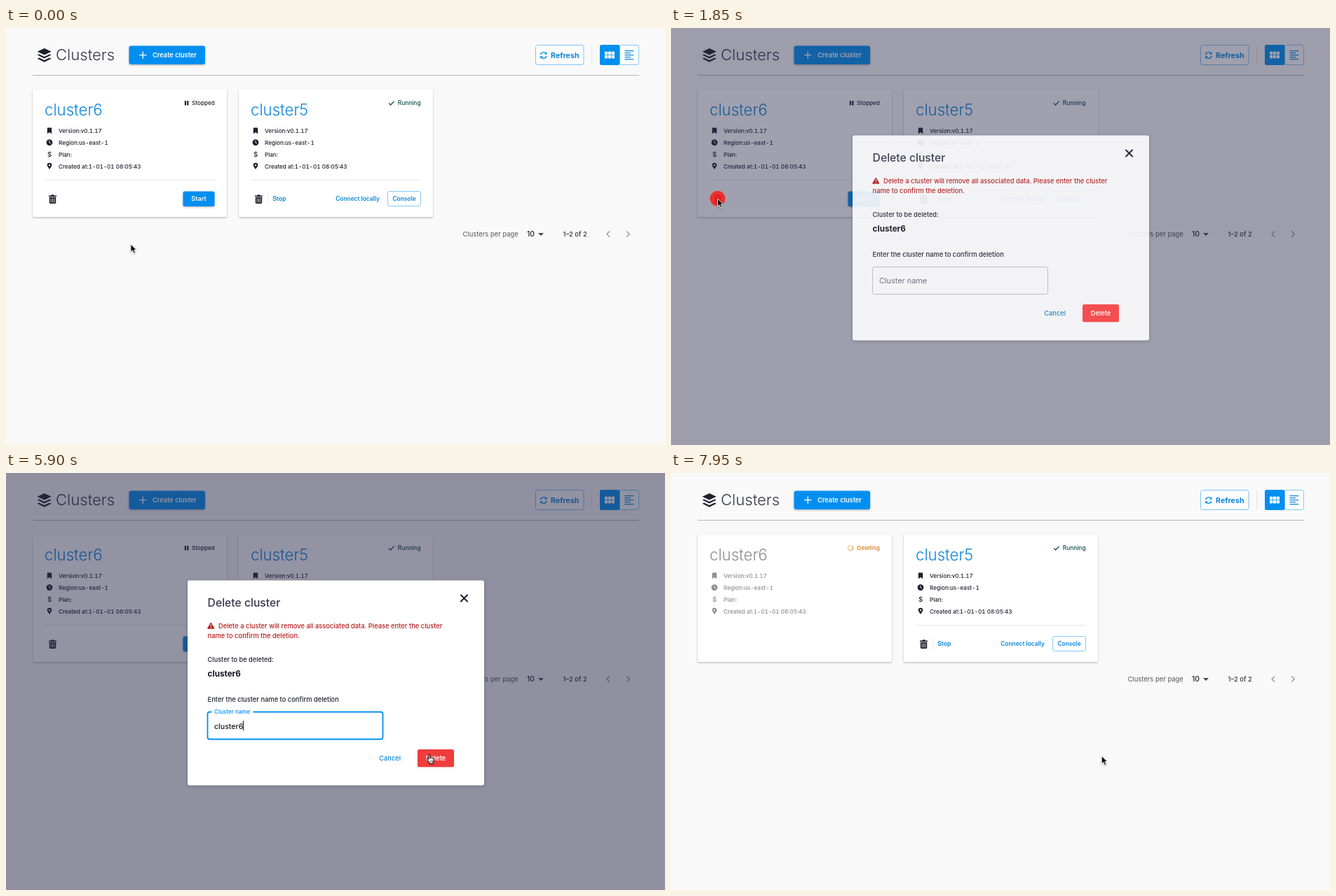
These frames come from a looping animation (940x596 px, 8000 ms). An HTML page:

```html
<!DOCTYPE html>
<html lang="en">
<head>
<meta charset="utf-8">
<title>Clusters</title>
<style>
  html, body { margin: 0; width: 100%; height: 100%; overflow: hidden; background: #f9f9f9; }
  svg { display: block; width: 940px; height: 596px; font-family: Inter, "Open Sans", sans-serif; font-optical-sizing: none; }
  text { white-space: pre; }
  .raised { filter: drop-shadow(0 1px 1.5px rgba(0, 0, 0, .3)); }
  .facts { font-variant-numeric: tabular-nums; }
</style>
</head>
<body>
<svg id="stage" viewBox="0 0 940 596" xmlns="http://www.w3.org/2000/svg"></svg>
<script>
const LOOP = 8000, STEP = 50;
const BLUE = '#008ff0', LINK = '#0c86d8', DARK = '#20202f', RED = '#b71c1c';

const stage = document.getElementById('stage');
const $ = id => document.getElementById(id);

const text = (x, y, size, weight, fill, str, anchor = 'start', id = '') =>
  `<text ${id && `id="${id}"`} x="${x}" y="${y}" font-size="${size}" font-weight="${weight}" fill="${fill}" text-anchor="${anchor}">${str}</text>`;
const box = (x, y, w, h, r, fill, extra = '') =>
  `<rect x="${x}" y="${y}" width="${w}" height="${h}" rx="${r}" fill="${fill}" ${extra}/>`;
const line = (d, stroke, width = 1, extra = '') =>
  `<path d="${d}" fill="none" stroke="${stroke}" stroke-width="${width}" ${extra}/>`;
const shape = (d, fill, extra = '') => `<path d="${d}" fill="${fill}" ${extra}/>`;
const at = (x, y, body, extra = '') => `<g transform="translate(${x} ${y})" ${extra}>${body}</g>`;

// Page parts
function header() {
  const layers = shape('M0-10 10-5.2 0-.6-10-5.2z', DARK) +
    shape('M-7.6-1.6 0 1.9 7.6-1.6 10-.4 0 4.4-10-.4z', DARK) +
    shape('M-7.6 3.6 0 7 7.6 3.6 10 4.8 0 9.7-10 4.8z', DARK);
  const half = line('M-4.2-.8A4.2 4.2 0 0 1 3.2-2.8', BLUE, 1.4) + shape('M4.7-4.9V-1.2H1z', BLUE);
  let grid = '', rows = '';
  for (let i = 0; i < 6; i++) grid += box(854 + i % 3 * 4.9, 33.7 + (i > 2 ? 5.2 : 0), 4.2, 4.5, 0, '#fff');
  for (let i = 0; i < 5; i++) rows += `M882.5 ${32.6 + i * 3}h${i % 2 ? 8.5 : 12.8}`;
  return at(54.7, 39, layers) +
    text(71, 46, 22.1, 350, '#36364d', 'Clusters') +
    box(175.5, 25.5, 108.5, 26.5, 3, BLUE, 'class="raised"') +
    line('M190 38.7h10.5M195.2 33.5v10.5', '#fff', 1.3) +
    text(209, 42, 9.25, 600, '#fff', 'Create cluster') +
    box(755.5, 24.5, 68.5, 28, 3, '#fdfdfd', 'stroke="#80c2f1"') +
    at(766.8, 39, half + `<g transform="rotate(180)">${half}</g>`) +
    text(777, 43, 10.7, 700, LINK, 'Refresh') +
    line('M835.5 25v28', '#e4e4e4') +
    box(875, 24.5, 27.5, 28, 2.5, '#fdfdfd', 'stroke="#86c8f4"') +
    box(847, 24, 28.5, 29, 2.5, BLUE) + grid + line(rows, LINK, 1.2) +
    line('M38 67.5h865', '#b5b5b9');
}

function trash(x) {
  return shape(`M${x} 239.6h3.2l.8-1.4h3l.8 1.4h3.2v1.6h-11z`, DARK) +
    shape(`M${x + .8} 242h9.4v7.6q0 1.4-1.4 1.4h-6.6q-1.4 0-1.4-1.4z`, DARK) +
    line(`M${x + 3.1} 243.5v6M${x + 5.5} 243.5v6M${x + 7.9} 243.5v6`, '#fff', .8);
}

function details(x, name, id) {
  const ink = 'currentColor';
  const rows = ['Version:v0.1.17', 'Region:us-east-1', 'Plan:', 'Created at:1-01-01 08:05:43'];
  return text(x + 17, 124.6, 22.2, 300, LINK, name, 'start', id + 'Name') +
    `<g id="${id}Info" class="facts" color="${DARK}">` +
    at(x + 24, 146.8, shape('M-3.2-3.6q0-.8.8-.8h4.8q.8 0 .8.8v8L0 2.2-3.2 4.4z', ink)) +
    at(x + 24, 163.6, `<circle r="4.4" fill="${ink}"/>` + line('M0-2.6V.2L1.8 1.4', '#fff', .9)) +
    text(x + 24, 184, 9.6, 500, ink, '$', 'middle') +
    at(x + 24, 197.3, shape('M0 4.6C-1 3-3.3.8-3.3-1.2a3.3 3.3 0 0 1 6.6 0C3.3.8 1 3 0 4.6z', ink) + '<circle cy="-1.2" r="1.2" fill="#fff"/>') +
    rows.map((s, i) => text(x + 37, 149.9 + i * 16.9, 8.15, 500, ink, s)).join('') + '</g>';
}

function cards() {
  const paper = (x, id) => box(x, 88, 277, 182.3, 2, '#fff', `id="${id}"`);
  const rule = x => line(`M${x + 17} 217.5h243`, '#e8e8ea');
  let ticks = '';
  for (let a = 0; a < 8; a++) ticks += `<path d="M-1 -3.5h2" transform="rotate(${a * 45})" opacity="${1 - a * .09}"/>`;
  return paper(38, 'paperA') + details(38, 'cluster6', 'a') +
    `<g id="stopped">` + box(254.8, 104, 2.2, 6.6, .4, DARK) + box(258.2, 104, 2.2, 6.6, .4, DARK) +
    text(297.8, 110.3, 8.15, 500, DARK, 'Stopped', 'end') + rule(38) + trash(61) +
    box(252.5, 233.5, 45, 21.5, 2.5, BLUE, 'class="raised"') +
    text(275, 247.4, 9.1, 600, '#fff', 'Start', 'middle') + '</g>' +
    `<g id="deleting">` + at(256, 107.2, `<g id="spin" stroke="#e07b10" stroke-width="1.4">${ticks}</g>`) +
    text(297.8, 110.3, 8.15, 500, '#d9760f', 'Deleting', 'end') + '</g>' +
    paper(332, 'paperB') + details(332, 'cluster5', 'b') +
    line('M546 107.4l2.6 2.6 5-5.4', '#0d4b4b', 1.3) +
    text(591.6, 110.3, 8.4, 500, '#0d4b4b', 'Running', 'end') + rule(332) + trash(355) +
    line('M373.5 235v18', '#ededee') +
    text(380.2, 247.4, 8.7, 600, LINK, 'Stop') +
    text(533, 247.4, 8.4, 600, LINK, 'Connect locally', 'end') +
    box(544.5, 233.5, 47, 21, 2.5, '#fff', 'stroke="#86c8f4"') +
    text(568, 247.4, 8.4, 600, LINK, 'Console', 'middle');
}

function pager() {
  return text(651.5, 298, 9.45, 400, '#55555f', 'Clusters per page') +
    text(743, 298, 10.4, 500, DARK, '10') + shape('M759 293h8l-4 4z', '#44444f') +
    text(794.5, 298, 9.4, 500, '#33333f', '1–2 of 2') +
    line('M861 290.5l-4 4 4 4M885.3 290.5l4 4-4 4', '#8f8f96', 1.2);
}

function dialog() {
  return box(259, 153.5, 423, 293, 3, '#fff', 'style="filter:drop-shadow(0 1px 2px rgba(0,0,0,.25))"') +
    text(287.6, 191.4, 15.7, 500, '#36364d', 'Delete cluster') +
    line('M649 174.6l9 9M658 174.6l-9 9', DARK, 2.1, 'stroke-linecap="round"') +
    shape('M292.2 214l4.6 8.2h-9.2z', RED, `stroke="${RED}" stroke-linejoin="round"`) +
    line('M292.2 216.2v3M292.2 220.2v1.2', '#fff', 1.1) +
    text(303, 221.8, 9.37, 500, RED, 'Delete a cluster will remove all associated data. Please enter the cluster') +
    text(287.6, 236, 9.37, 500, RED, 'name to confirm the deletion.') +
    text(287.6, 270.2, 9.2, 500, DARK, 'Cluster to be deleted:') +
    text(287.6, 291, 11.7, 700, '#15151f', 'cluster6') +
    text(287.6, 326.6, 9.36, 500, DARK, 'Enter the cluster name to confirm deletion') +
    box(287.5, 341.5, 250, 39, 3, 'none', 'id="field"') +
    text(297, 364.9, 10.9, 400, '#6d6d76', 'Cluster name', 'start', 'hint') +
    `<g id="label">` + box(293.5, 340, 59, 4, 0, '#fff') + text(297, 344.2, 8.1, 500, BLUE, 'Cluster name', 'start', 'labelText') + '</g>' +
    text(297, 365.5, 10.6, 500, '#15151f', '', 'start', 'value') +
    box(338, 354, 1, 14, 0, '#111', 'id="caret"') +
    text(547.7, 411.3, 9.25, 500, LINK, 'Cancel', 'middle') +
    box(587, 395, 52, 25.3, 2.5, '#ff4444', 'id="del"') +
    text(613, 411, 9.2, 600, '#fff', 'Delete', 'middle');
}

const badge = (id, w, y, str) => `<g id="${id}">` + box(470 - w / 2, y, w, 22, 11, '#1c1c1e') +
  text(470, y + 15.4, 12, 400, '#fff', str, 'middle') + '</g>';

function cursors() {
  const arrow = shape('M0 0v11.2l2.6-2.4 1.9 4.3 2-.9-1.9-4.2h3.5z', '#000', 'stroke="#fff" stroke-width=".9"');
  const beam = line('M-2.6-5.6q2.1 0 2.6 1 .5-1 2.6-1M0-4.6v9.2M-2.6 5.6q2.1 0 2.6-1 .5 1 2.6 1M-1.3.8h2.6', '#111', 1.1);
  const hand = shape('M-.9 1q0-1.3 1-1.3t1 1.3v3.8q.8-.7 1.7 0 .9-.7 1.7.2 1.7-.3 1.7 1.2v2.2q0 1.6-.9 2.7v1.5H.2v-1.4L-3 7.3q-.8-1.2.2-1.7 1-.2 1.9 1.2z', '#fff', 'stroke="#000" stroke-width="1"') +
    line('M1.4 8.2v2.6M3 8.2v2.6M4.6 8.2v2.6', '#000', .6);
  const wrap = (id, s) => `<g id="${id}">${s}</g>`;
  return `<g id="pointer" style="filter:drop-shadow(0 1px 1px rgba(0,0,0,.3))">` +
    wrap('arrow', arrow) + wrap('beam', beam) + wrap('hand', hand) + '</g>';
}

stage.innerHTML = box(0, 0, 940, 596, 0, '#f9f9f9') + header() + cards() + pager() +
  box(0, 0, 940, 596, 0, 'rgb(41,41,74)', 'id="scrim"') +
  `<g id="dialog">${dialog()}</g>` +
  badge('word', 62, 531, 'cluster') + badge('digit', 27, 559, '6') +
  '<circle id="ring" r="14" fill="#ff2020"/><circle id="dot" fill="#fb1a1a"/>' + cursors();

// Timing helpers
const clamp = v => Math.min(1, Math.max(0, v));
const ramp = (t, from, len) => clamp((t - from) / len);
const mix = (a, b, k) => a + (b - a) * k;
const inOut = u => u < .5 ? .5 * (2 * u) ** 2.4 : 1 - .5 * (2 - 2 * u) ** 2.4;

// cubic-bezier(.4, 0, .2, 1)
function standard(x) {
  let lo = 0, hi = 1;
  for (let i = 0; i < 24; i++) {
    const s = (lo + hi) / 2;
    if (1.2 * s * (1 - s) ** 2 + .6 * s * s * (1 - s) + s ** 3 < x) lo = s; else hi = s;
  }
  return 3 * lo * lo * (1 - lo) + lo ** 3;
}

const moves = [
  [100, 1300, 66.5, 244],
  [2700, 3350, 350.5, 358.5],
  [4950, 6100, 614.3, 404.5]
];
function pointerAt(t) {
  let x = 178, y = 309;
  for (const [from, to, nx, ny] of moves) {
    const k = inOut(ramp(t, from, to - from));
    x = mix(x, nx, k);
    y = mix(y, ny, k);
  }
  return [x, y];
}

const show = (id, on) => $(id).setAttribute('visibility', on ? 'visible' : 'hidden');
const set = (id, attrs) => { for (const k in attrs) $(id).setAttribute(k, attrs[k]); };

function press(t) {
  const second = t >= 6600, age = t - (second ? 6600 : 1650);
  const on = age >= 0 && age < 550;
  show('dot', on);
  show('ring', on && second);
  if (!on) return;
  const spot = second ? { cx: 614.5, cy: 406 } : { cx: 66.5, cy: 243.7 };
  const r = age < 100 ? mix(8, 14, age / 100) : 14 * (1 - (age - 100) / 450);
  set('dot', { ...spot, r, opacity: .84 });
  set('ring', { ...spot, opacity: age < 100 ? 0 : .5 * (1 - ramp(age, 100, 350)) });
}

function render(t) {
  const fade = t < 5000 ? standard(ramp(t, 1713, 225)) : 1 - standard(ramp(t, 7566, 195));
  const gone = t >= 7600, open = fade > 0;
  const [x, y] = pointerAt(t);

  set('scrim', { opacity: fade * .5 });
  set('dialog', { opacity: fade });

  const lift = ramp(t, 650, 250) * (1 - ramp(t, 1750, 100));
  $('paperA').style.filter = `drop-shadow(.5px 1px ${mix(1, 3.4, lift)}px rgba(0,0,0,${mix(.3, .6, lift)}))`;
  $('paperB').style.filter = 'drop-shadow(.5px 1px 1px rgba(0,0,0,.3))';
  show('stopped', !gone);
  show('deleting', gone);
  set('aName', { fill: gone ? '#8e8e90' : LINK });
  set('aInfo', { color: gone ? '#8e8e92' : DARK });
  set('spin', { transform: `rotate(${(t - 7600) * .18})` });

  const filled = t >= 3650, focus = filled && t < 6550;
  const inField = x > 288 && x < 538 && y > 341 && y < 381;
  set('field', {
    stroke: focus ? BLUE : open && inField ? '#25252f' : '#c4c4c8',
    'stroke-width': focus ? 1.8 : 1
  });
  show('hint', !filled);
  show('label', filled);
  set('labelText', { fill: focus ? BLUE : '#6d6d76' });
  $('value').textContent = !filled || gone ? '' : t < 3700 ? 'cluster' : 'cluster6';
  show('caret', focus && t >= 3700 && (t < 4050 || (t - 4550 + 1000) % 1000 < 500));

  const hot = ramp(t, 5850, 250);
  set('del', { fill: `rgb(${mix(255, 183, hot)},${mix(68, 28, hot)},${mix(68, 28, hot)})` });
  $('del').style.filter = `drop-shadow(0 1.5px 2px rgba(0,0,0,${.42 * hot}))`;

  show('word', t >= 3650 && t < 4700);
  set('word', { transform: `translate(0 ${t < 3700 ? 28 : 0})` });
  show('digit', t >= 3700 && t < 5100);

  press(t);
  const onDelete = x > 587 && y > 395 && t < 7800;
  set('pointer', { transform: `translate(${x} ${y})` });
  show('beam', open && inField);
  show('hand', onDelete);
  show('arrow', !(open && inField) && !onDelete);
}

const start = performance.now();
function tick() {
  const t = (performance.now() - start + 2) % LOOP;
  render(Math.floor(t / STEP) * STEP);
  requestAnimationFrame(tick);
}
tick();
</script>
</body>
</html>
```
